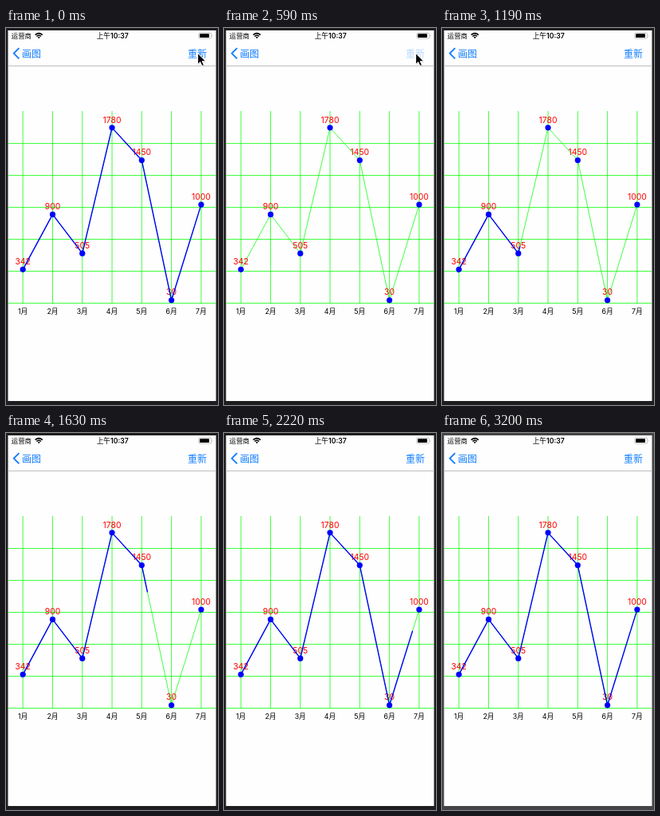
An HTML page that plays this animation: 266x472 px, repeating every 3.3 s.

```html
<!DOCTYPE html>
<html lang="zh">
<head>
<meta charset="utf-8">
<title>Line chart</title>
<style>
  html, body { margin: 0; width: 100%; height: 100%; overflow: hidden; }
  svg { display: block; width: 266px; height: 472px; }
  text { font-family: Inter, "Noto Sans CJK SC", "Noto Sans CJK", sans-serif; }
  .mid { text-anchor: middle; }
  .nav { font-size: 12px; fill: #127eff; }
  .value { font-size: 10.4px; fill: #f00; }
  .month { font-size: 8.8px; fill: #000; }
  .status { font-size: 8.4px; }
  .time { font-size: 8.7px; }
  .clock { font-weight: 600; }
</style>
</head>
<body>
<svg viewBox="0 0 266 472">
  <rect id="frame" width="266" height="472"/>
  <rect x="2.5" y="3" width="261" height="464" fill="#fefefe"/>
  <rect x="2.5" y="47" width="261" height="1" fill="#bfbfbf"/>

  <text class="status" x="6.8" y="13">运营商</text>
  <g fill="none" stroke="#000" stroke-width="1.5">
    <path d="M36.6 8.6Q41.2 4.6 45.8 8.6"/>
    <path d="M38.4 10.5Q41.2 8.1 44 10.5"/>
  </g>
  <path d="M39.6 11.6Q41.2 10.4 42.8 11.6L41.2 13.3Z"/>
  <text class="time mid" x="133.7" y="12.9">上午<tspan class="clock">10:37</tspan></text>
  <rect x="241.7" y="6.2" width="16" height="7" rx="2" fill="none" stroke="#a5a5a5" stroke-width=".7"/>
  <rect x="243" y="7.3" width="12" height="4.8" rx="1"/>
  <path d="M258.8 8.4Q260.2 9.7 258.8 11Z" fill="#a5a5a5"/>

  <path d="M16.4 25.2L9.8 31.8L16.4 38.4" fill="none" stroke="#127eff" stroke-width="1.9"/>
  <text class="nav" x="20" y="36.9">画图</text>
  <text id="redo" class="nav" x="228" y="36.9">重新</text>

  <g id="grid" fill="none" stroke="#0f0" stroke-width=".75"></g>
  <g id="marks"></g>
  <path id="trace" fill="none" stroke="#00f" stroke-width="1.4" stroke-linejoin="round"
        pathLength="1" stroke-dasharray="1 2"/>

  <g id="cursor" transform="translate(.4 .5)">
    <path d="M240.8 32.2V46L244 43.1L246.2 48L248.6 47L246.4 42.3H250.6Z" opacity=".2"/>
    <path d="M240.2 31.2V45L243.3 42.1L245.5 47L248 45.9L245.8 41.2H250.2Z" stroke="#fff"/>
  </g>
</svg>
<script>
  const LOOP = 3300, PRESS = 440, RELEASE = 548, DRAW = 1955, FADE = 350;
  const TICK = 148.3; // the picture refreshes at this pace after the press
  const values = [342, 900, 505, 1780, 1450, 30, 1000];
  const $ = id => document.getElementById(id);
  const px = i => 21.2 + i * 37.28;
  const py = v => 344.5 - v * 0.1234;

  function add(parent, tag, attrs, text = '') {
    const el = document.createElementNS('http://www.w3.org/2000/svg', tag);
    for (const key in attrs) el.setAttribute(key, attrs[key]);
    el.textContent = text;
    parent.append(el);
  }

  const line = 'M' + values.map((v, i) => px(i) + ' ' + py(v)).join('L');
  const grid = $('grid'), marks = $('marks');

  for (let row = 0; row < 6; row++)
    add(grid, 'path', { d: `M2.5 ${py(0) - row * 40}H263.5` });
  values.forEach((v, i) => {
    const x = px(i), y = py(v);
    add(grid, 'path', { d: `M${x} 104V345` });
    add(marks, 'text', { class: 'month mid', x, y: 358.2 }, i + 1 + '月');
    add(marks, 'text', { class: 'value mid', x, y: y - 6.3 }, v);
    add(marks, 'circle', { cx: x, cy: y, r: 3.6, fill: '#00f' });
  });
  add(grid, 'path', { d: line });
  $('trace').setAttribute('d', line);

  function prepare(id, frames, duration, easing) {
    const anim = $(id).animate(frames, { delay: RELEASE, duration, easing, fill: 'both' });
    anim.pause();
    return anim;
  }
  const trace = prepare('trace', { strokeDashoffset: [1, 0] }, DRAW, 'ease-in-out');
  const redo = prepare('redo', { opacity: [0.2, 1] }, FADE, 'linear');

  // Time of the latest refresh, on a 10 ms clock
  function held(t) {
    const stamp = n => Math.ceil((PRESS + n * TICK) / 10) * 10;
    let n = 0;
    while (stamp(n + 1) <= t) n++;
    return stamp(n);
  }

  function draw(now) {
    const t = now % LOOP, shown = held(t);
    trace.currentTime = shown > PRESS ? shown : LOOP;
    redo.currentTime = t < PRESS ? LOOP : shown;
    $('cursor').setAttribute('visibility', t < 1190 ? 'visible' : 'hidden');
    $('frame').setAttribute('fill', t < 3200 ? '#1e1d1f' : '#454446');
  }

  let start;
  function tick(now) {
    start ??= now;
    draw(now - start);
    requestAnimationFrame(tick);
  }
  draw(0);
  requestAnimationFrame(tick);
</script>
</body>
</html>
```
